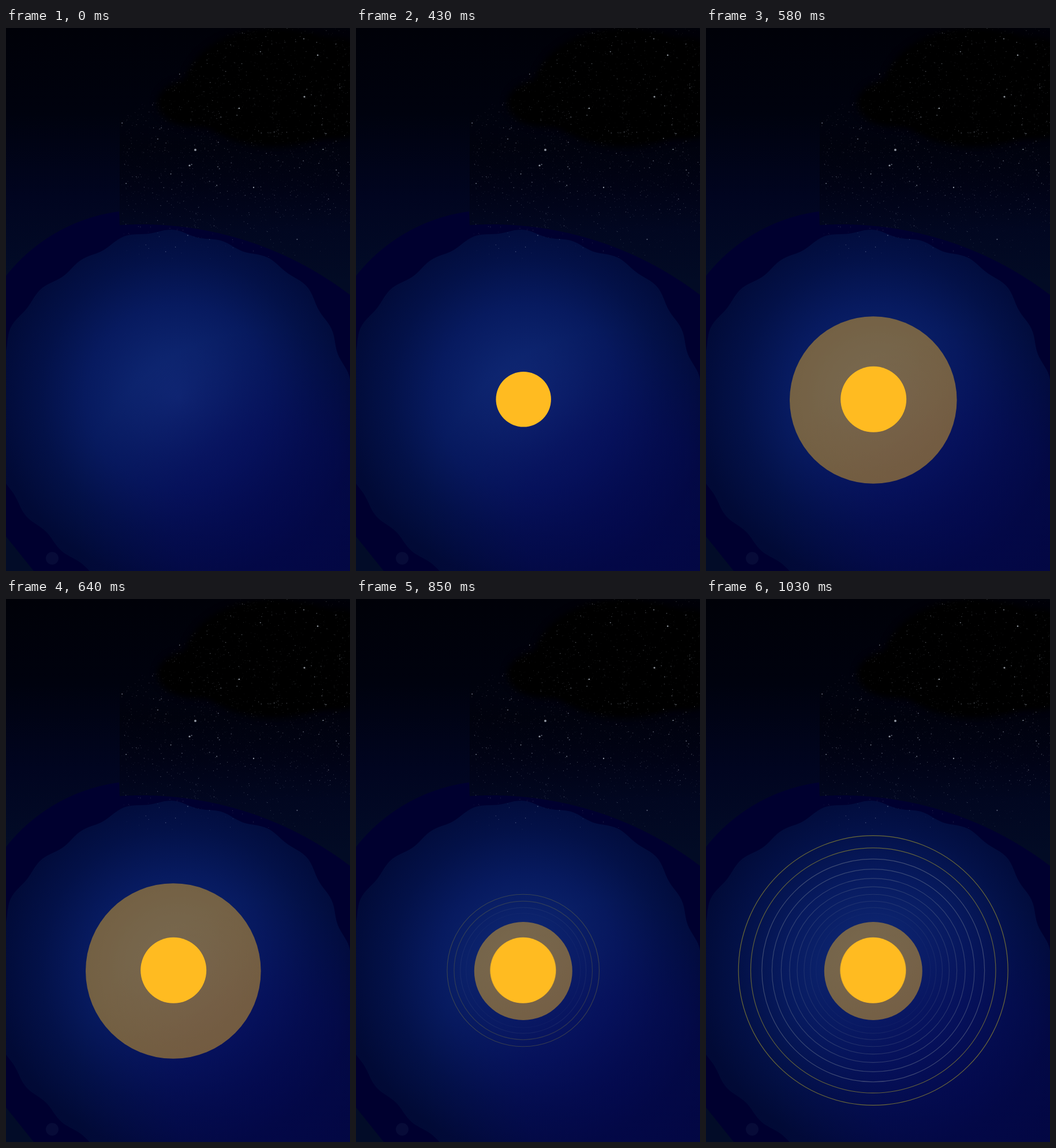
An HTML page with a canvas that plays this animation: 596 px wide and 940 px high, repeating every 1060 ms.

```html
<!DOCTYPE html>
<html lang="en">
<head>
<meta charset="utf-8">
<title>Sunrise pulse</title>
<style>
  html, body { margin: 0; width: 100%; height: 100%; overflow: hidden; background: #000108; }
  canvas, svg { position: absolute; left: 0; top: 0; width: 596px; height: 940px; }
  #sun { fill: #ffbb21; }
  #halo { fill: #ffbb21; fill-opacity: .44; }
  #rings circle { fill: none; stroke-width: 1.2; }
</style>
</head>
<body>
<canvas id="sky" width="596" height="940"></canvas>
<svg viewBox="0 0 596 940">
  <g id="rings"></g>
  <circle id="halo" cx="289.8" cy="644" r="0"/>
  <circle id="sun" cx="290.2" cy="642.8" r="0"/>
</svg>
<script>
const $ = id => document.getElementById(id);
const g = $('sky').getContext('2d');
const W = 596, H = 940, EDGE = 197;

// Background -------------------------------------------------------------

function ramp(gradient, ...colors) {
  colors.forEach((color, i) => gradient.addColorStop(i / (colors.length - 1), color));
  return gradient;
}
const down = (y0, y1, ...colors) => ramp(g.createLinearGradient(0, y0, 0, y1), ...colors);
const glow = (x, y, r, ...colors) => ramp(g.createRadialGradient(x, y, 0, x, y, r), ...colors);

function randomizer(seed) {
  return () => {
    seed = (seed * 1664525 + 1013904223) % 4294967296;
    return seed / 4294967296;
  };
}

function box(x, y, fill) {
  g.fillStyle = fill;
  g.fillRect(x, y, W - x, H - y);
}

function dot(x, y, r, color, ry = r) {
  g.fillStyle = color;
  g.beginPath();
  g.ellipse(x, y, r, ry, 0, 0, 7);
  g.fill();
}

function drawNight() {
  box(0, 0, down(0, 440, '#000108', '#00020e', '#010520', '#020c28'));

  // darker starfield panel with a hard left edge
  box(EDGE, 130, down(130, 350, 'rgba(0,1,8,0)', 'rgba(0,1,8,.6)', 'rgba(0,1,10,.45)', 'rgba(0,1,10,.1)'));

  g.filter = 'blur(6px)';
  dot(465, 103, 155, '#000', 103);
  dot(330, 130, 68, '#000', 42);
  dot(570, 105, 110, '#000', 88);
  g.filter = 'none';
}

// Top of a circle: y on its upper half at x
const dome = (x, cx, cy, r) => cy - Math.sqrt(r * r - (x - cx) ** 2);

function drawRim() {
  g.fillStyle = '#00002f';
  g.beginPath();
  for (let x = 0; x <= W; x++) {
    g.lineTo(x, x < EDGE ? dome(x, 235, 614, 299) : dome(x, 235, 935, 595));
  }
  g.lineTo(W, H);
  g.lineTo(48, H);
  g.lineTo(0, 880);
  g.fill();
}

function drawGlobe() {
  const cx = 290, cy = 665;
  g.save();
  g.beginPath();
  for (let a = 0; a < Math.PI * 2; a += .02) {
    const r = 310 + 5 * Math.sin(a * 7 + 1) + 3 * Math.sin(a * 23);
    g.lineTo(cx + r * Math.cos(a), cy + r * Math.sin(a));
  }
  g.closePath();
  g.rect(cx, cy, W, H);
  g.clip();
  box(0, 340, glow(298, 638, 400, '#112a78', '#0c236d', '#071a5f', '#031148', '#010a36', '#010834'));
  // richer blue towards the bottom and the right
  box(0, 440, glow(460, 860, 340, 'rgba(4,6,84,.6)', 'rgba(5,7,86,.45)', 'rgba(4,8,80,0)'));
  g.restore();

  dot(80, 918, 11, 'rgba(30,50,90,.22)');
}

function drawStars() {
  const rnd = randomizer(71);
  for (let i = 0; i < 2900; i++) {
    const x = 200 + rnd() * 396, y = rnd() * 405;
    const keep = rnd(), light = rnd(), size = rnd();
    const corner = x < 400 - y * 1.25;
    if (corner || keep > (405 - y) / 115) continue;
    dot(x, y, .35 + .25 * size + .5 * size ** 40, `rgba(190,200,215,${.1 + .5 * light ** 3 + .3 * size ** 40})`);
  }
  const landmarks = [[328, 211, 2], [318, 238, 1.6], [517, 119, 1.6], [540, 47, 1.3], [404, 139, 1.3], [429, 276, 1.2]];
  for (const [x, y, r] of landmarks) dot(x, y, r, 'rgba(190,198,208,.75)');
}

drawNight();
drawRim();
drawGlobe();
drawStars();

// Motion -----------------------------------------------------------------

const LOOP = 1060, TICK = 30;

// Each stop is [ms, style, hold]; values advance once per tick unless held.
function play(el, stops) {
  const frames = stops.map(([ms, style, hold], i) => {
    const next = stops[i + 1] ? stops[i + 1][0] : ms;
    const ticks = Math.max(1, Math.round((next - ms) / TICK));
    return { ...style, offset: ms / LOOP, easing: hold ? 'step-end' : `steps(${ticks}, end)` };
  });
  // a 1 ms lead keeps tick boundaries clear of rounding
  el.animate(frames, { duration: LOOP, iterations: Infinity, delay: -1 });
}

const drop = (y, r, opacity, x = 0) => ({ transform: `translate(${x}px, ${y}px)`, r: r + 'px', opacity });
play($('sun'), [
  [0, drop(-313, 10.7, 0), true],
  [100, drop(-313, 10.7, 0)],
  [310, drop(0, 10.7, 1)],
  [460, drop(0, 57, 1), true],
  [760, drop(0, 57, 1, -.8), true],
  [LOOP, drop(0, 57, 1, -.8)]
]);

play($('halo'), [
  [0, { r: '0px' }, true],
  [460, { r: '50px' }],
  [610, { r: '168.5px' }],
  [760, { r: '85px' }, true],
  [LOOP, { r: '85px' }]
]);

// Every tick leaves a ring a tenth larger than the last; it dulls after two ticks.
for (let n = 0; n < 10; n++) {
  const ring = document.createElementNS('http://www.w3.org/2000/svg', 'circle');
  ring.setAttribute('cx', 289.7);
  ring.setAttribute('cy', 643);
  ring.setAttribute('r', 99 * 1.1 ** n);
  $('rings').append(ring);

  const born = 760 + n * TICK, dull = born + 2 * TICK;
  const fresh = { opacity: 1, stroke: `rgba(196,180,40,${.1 + .05 * n})` };
  const old = { opacity: 1, stroke: `rgba(150,160,165,${.05 + .048 * n})` };
  const stops = [[0, { ...fresh, opacity: 0 }, true], [born, fresh, true]];
  if (dull < LOOP) stops.push([dull, old, true], [LOOP, old]);
  else stops.push([LOOP, fresh]);
  play(ring, stops);
}
</script>
</body>
</html>
```
